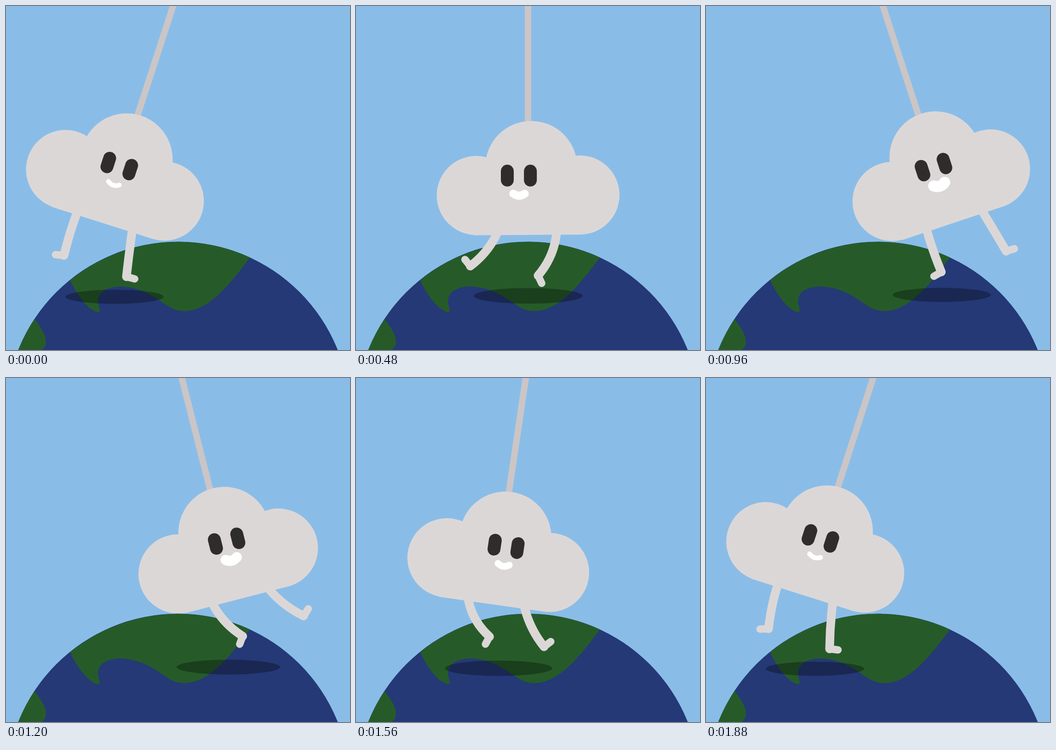
An HTML page for the animation above (1.92 s loop, 748 by 748 pixels).

```html
<!DOCTYPE html>
<html lang="en">
<head>
<meta charset="utf-8">
<title>Swinging cloud</title>
<style>
  html, body { margin: 0; width: 100%; height: 100%; overflow: hidden; background: #89bde8; }
  svg { display: block; width: 100%; height: 100%; }
</style>
</head>
<body>
<svg viewBox="0 0 748 748">
  <rect width="748" height="748" fill="#89bde8"/>
  <circle cx="374" cy="886.5" r="374" fill="#243976"/>
  <g fill="#265b29">
    <path d="M139.5 596C152 624 172 652 190 662C199 667.500 205 667 203.500 659C201 651 199.500 646 200.500 637C203 619 225 610 248 610C288 610 319 629 345 648C362 660 375 663.500 388 663.500C440 663 484 609 530.500 546.800A374 374 0 0 0 139.500 596Z"/>
    <path d="M62 680.300C75 698 88 716 87 731C86.500 740 82 745 77 748H26.600A374 374 0 0 1 62 680.300Z"/>
  </g>
  <ellipse id="shadow" fill="#000" opacity=".31"/>
  <g id="swing">
    <path d="M374 -33V300" stroke="#cbc5c6" stroke-width="14"/>
    <g fill="none" stroke="#dcd7d7" stroke-linecap="round">
      <path id="leftLeg" stroke-width="18.800"/>
      <path id="leftFoot" stroke-width="16"/>
      <path id="rightLeg" stroke-width="18.800"/>
      <path id="rightFoot" stroke-width="16"/>
    </g>
    <g fill="#dcd7d7">
      <circle cx="381" cy="350" r="100"/>
      <circle cx="261.500" cy="412" r="86"/>
      <circle cx="487" cy="411" r="86"/>
      <path d="M257 498.600L490 497V400L381 340L261 400Z"/>
    </g>
    <g id="face">
      <g id="eyes" fill="#2f2d2b">
        <rect x="-14" y="-23.700" width="28" height="47.400" rx="14"/>
        <rect x="36.200" y="-23.700" width="28" height="47.400" rx="14"/>
      </g>
      <path id="mouth" d="M13 408Q25.500 417 38 408" fill="none" stroke="#fff" stroke-linecap="round"/>
    </g>
  </g>
</svg>
<script>
const LOOP = 1920, HALF = 960, STEP = 40;
const RAD = Math.PI / 180;
const parts = {};
document.querySelectorAll('[id]').forEach(el => parts[el.id] = el);

const set = (name, attrs) => {
  for (const key in attrs) parts[name].setAttribute(key, attrs[key]);
};
const clamp = x => Math.min(1, Math.max(0, x));
const mix = (a, b, k) => a + (b - a) * k;
const smooth = x => x * x * (3 - 2 * x);

// cubic-bezier(.5, 0, .5, 1)
function swingEase(x) {
  let low = 0, high = 1;
  for (let i = 0; i < 30; i++) {
    const s = (low + high) / 2;
    if (1.5 * s * (1 - s) + s ** 3 < x) low = s; else high = s;
  }
  return smooth(low);
}

// 0 to 1 and back once per period
function pingPong(time, period = LOOP) {
  const x = ((time % period) + period) % period / (period / 2);
  return x < 1 ? x : 2 - x;
}

// time, lean and foot angle of the right leg
const rightKeys = [
  [0, 10.7, 3], [320, -14.3, -48], [480, -20.1, -65], [720, -12.5, -50],
  [1200, 35.6, 43], [1560, 32, 46], [1880, 13.5, 11]
];

function keyAt(i) {
  const n = rightKeys.length, turn = Math.floor(i / n);
  const [time, lean, foot] = rightKeys[i - turn * n];
  return [time + turn * LOOP, lean, foot];
}

// smooth periodic curve through the keys
function rightPose(time) {
  let i = rightKeys.length - 1;
  while (rightKeys[i][0] > time) i--;
  const [a, b, c, d] = [i - 1, i, i + 1, i + 2].map(keyAt);
  const span = c[0] - b[0], x = (time - b[0]) / span;
  return [1, 2].map(k => {
    const m0 = (c[k] - a[k]) / (c[0] - a[0]) * span;
    const m1 = (d[k] - b[k]) / (d[0] - b[0]) * span;
    return mix(b[k], c[k], smooth(x)) + m0 * x * (1 - x) ** 2 - m1 * x * x * (1 - x);
  });
}

function drawLeg(side, hipX, lean, length, foot, dir) {
  const hipY = 474;
  const sin = Math.sin(lean * RAD), cos = Math.cos(lean * RAD);
  const x = hipX + length * sin, y = hipY + length * cos;
  const bend = -0.34 * foot;
  const cx = (hipX + x) / 2 + bend * cos, cy = (hipY + y) / 2 - bend * sin;
  const toeX = x + dir * 18.5 * Math.cos(foot * RAD);
  const toeY = y - dir * 18.5 * Math.sin(foot * RAD);
  set(side + 'Leg', { d: `M${hipX} ${hipY}Q${cx} ${cy} ${x} ${y}` });
  set(side + 'Foot', { d: `M${x} ${y}L${toeX} ${toeY}` });
}

function draw(time) {
  const across = pingPong(time);
  const swing = swingEase(across);
  const late = smooth(pingPong(time - LOOP / 4));

  set('swing', { transform: `rotate(${mix(18, -18, swing)} 374 -33)` });

  const size = mix(0.9, 1, smooth(pingPong(time, HALF)));
  const shadowX = mix(236.3, 512.7, swing);
  set('shadow', {
    cx: shadowX, cy: 630.2 - (shadowX - 374.5) * 0.0148,
    rx: 118.5 * size, ry: 17 * size
  });

  const open = mix(0.01, 1, smooth(clamp(Math.abs(time - 320) / 120)));
  set('face', { transform: `translate(${mix(329, 361.4, late)} 0)` });
  set('eyes', { transform: `translate(0 368.8) scale(1 ${open})` });
  set('mouth', { 'stroke-width': mix(10.2, 24.2, smooth(across)) });

  const leftLean = mix(-36, 37, late);
  drawLeg('left', 315, leftLean, 117 - 0.003 * leftLean ** 2, mix(-51, 75, late), -1);
  const [rightLean, rightFoot] = rightPose(time);
  drawLeg('right', 437, rightLean, 121.5 - 0.005 * rightLean ** 2, rightFoot, 1);
}

const start = performance.now();
function tick() {
  const time = (performance.now() - start) % LOOP;
  draw(Math.floor(time / STEP) * STEP);
  requestAnimationFrame(tick);
}
tick();
</script>
</body>
</html>
```
